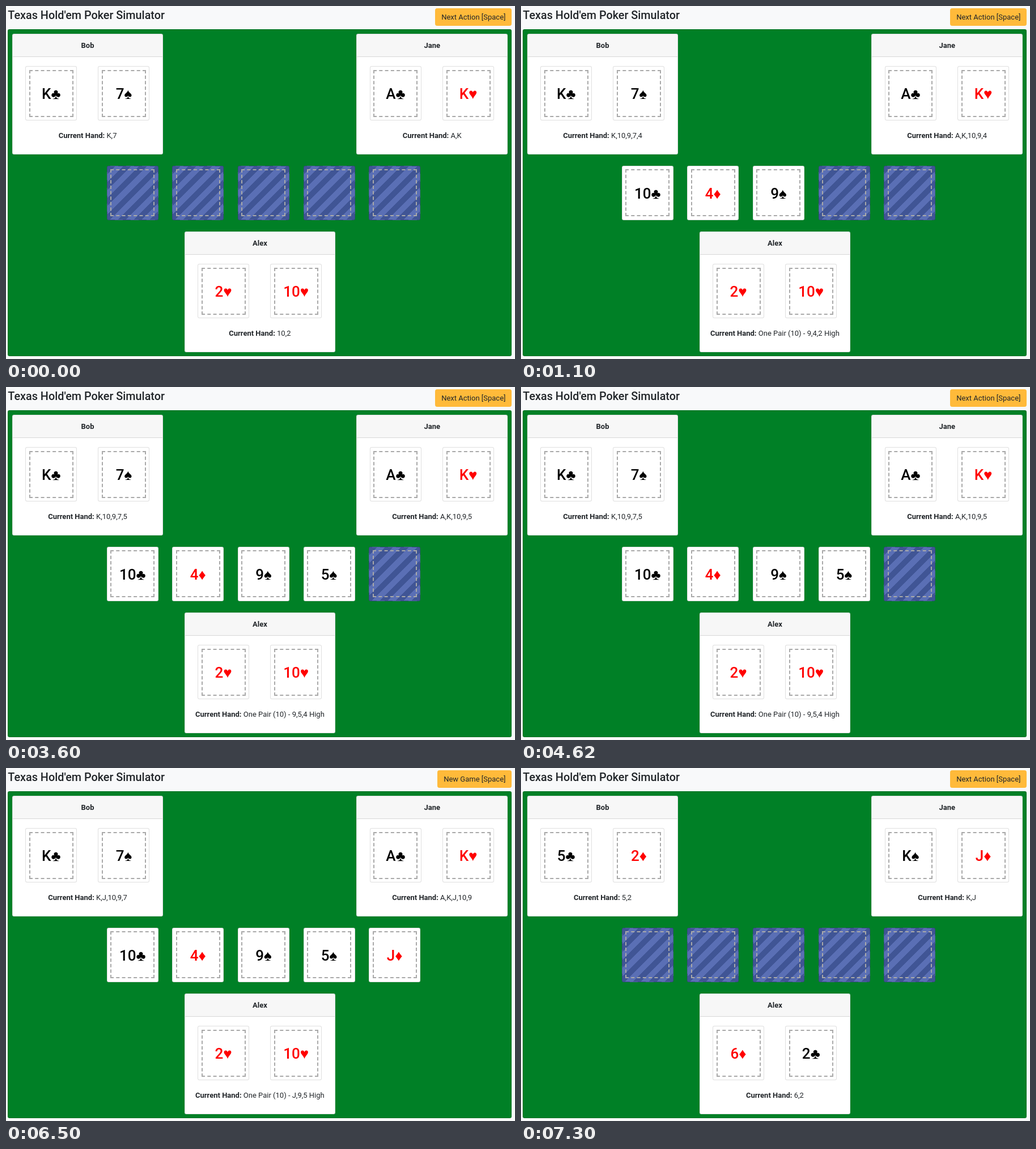
Recreate the animation shown at these times as an HTML page. Size 898 px wide and 623 px high, loop 8000 ms.

```html
<!DOCTYPE html>
<html lang="en">
<head>
<meta charset="utf-8">
<title>Poker Simulator</title>
<style>
* { box-sizing: border-box; }
html, body { margin: 0; width: 100%; height: 100%; overflow: hidden; }
body {
  position: relative;
  background: #f8f9fa;
  color: #212529;
  font: 13px/19.5px Roboto, "Liberation Sans", sans-serif;
}
h1, button, .felt, .panel, .card, .hand { position: absolute; margin: 0; }
h1 { left: 3.25px; top: 5.25px; font-size: 19.8px; font-weight: 500; line-height: 23.4px; white-space: nowrap; }
button {
  right: 5.75px; top: 4px; height: 31.25px; padding: 0 9.75px;
  border: 1px solid #ffba3a; border-radius: 3.25px;
  background: #ffba3a; color: inherit; font: inherit; white-space: nowrap;
}
.felt, .panel, .card { border: 1px solid rgba(0, 0, 0, .125); border-radius: 3.25px; }
.felt { left: 3.25px; top: 41px; width: 889.15px; height: 577px; background: #008026; }
.panel, .card { background: #fff; }
.panel { width: 266.6px; height: 212.75px; }
.name {
  height: 40px; line-height: 39px; text-align: center; font-weight: 700;
  background: rgba(0, 0, 0, .03); border-bottom: 1px solid rgba(0, 0, 0, .125);
}
.hand { left: 0; right: 0; top: 168.75px; text-align: center; white-space: nowrap; }
.card {
  width: 91px; height: 96px; color: #000;
  font-size: 26px; font-weight: 500; line-height: 96px; text-align: center;
}
.card::after { content: ""; position: absolute; inset: 5.5px; border: 2px dashed #a9a9a9; }
.red { color: #f00; }
.back { background: repeating-linear-gradient(-45deg, #405595, #405595 10px, #5a6fb5 10px, #5a6fb5 20px); }
</style>
</head>
<body>
<h1>Texas Hold'em Poker Simulator</h1>
<button></button>
<div class="felt"></div>
<div id="table"></div>
<script>
const LOOP = 8000;
const SEATS = [["Bob", 10.75, 49], ["Jane", 618.4, 49], ["Alex", 314.6, 398]];
const BOARD = ["10♣", "4♦", "9♠", "5♠", "J♦"];
const DEAL = ["K♣ 7♠", "A♣ K♥", "2♥ 10♥"];
const REDEAL = ["5♣ 2♦", "K♠ J♦", "6♦ 2♣"];

const STEPS = [
  { at: 0, open: 0, deal: DEAL, hands: ["K,7", "A,K", "10,2"] },
  { at: 1100, open: 3, deal: DEAL, hands: ["K,10,9,7,4", "A,K,10,9,4", "One Pair (10) - 9,4,2 High"] },
  { at: 3600, open: 4, deal: DEAL, hands: ["K,10,9,7,5", "A,K,10,9,5", "One Pair (10) - 9,5,4 High"] },
  { at: 5300, open: 5, deal: DEAL, hands: ["K,J,10,9,7", "A,K,J,10,9", "One Pair (10) - J,9,5 High"] },
  { at: 7300, open: 0, deal: REDEAL, hands: ["5,2", "K,J", "6,2"] }
];

const table = document.getElementById("table");
const button = document.querySelector("button");
const place = (x, y) => `style="left:${x}px;top:${y}px"`;

function card(face, x, y) {
  const kind = !face ? "back" : /[♥♦]/.test(face) ? "red" : "";
  return `<div class="card ${kind}" ${place(x, y)}>${face}</div>`;
}

function panel([name, x, y], deal, hand) {
  const [a, b] = deal.split(" ");
  return `<div class="panel" ${place(x, y)}><div class="name">${name}</div>` +
    card(a, 22.5, 56.25) + card(b, 150.7, 56.25) +
    `<div class="hand"><b>Current Hand:</b> ${hand}</div></div>`;
}

function render({ open, deal, hands }) {
  button.textContent = (open === BOARD.length ? "New Game" : "Next Action") + " [Space]";
  table.innerHTML =
    SEATS.map((seat, i) => panel(seat, deal[i], hands[i])).join("") +
    BOARD.map((face, i) => card(i < open ? face : "", 177.75 + 115.6 * i, 281.75)).join("");
}

let shown;
const start = performance.now();
function tick() {
  const t = (performance.now() - start) % LOOP;
  const step = STEPS.findLast(s => s.at <= t);
  if (step !== shown) render(shown = step);
  requestAnimationFrame(tick);
}
tick();
</script>
</body>
</html>
```
